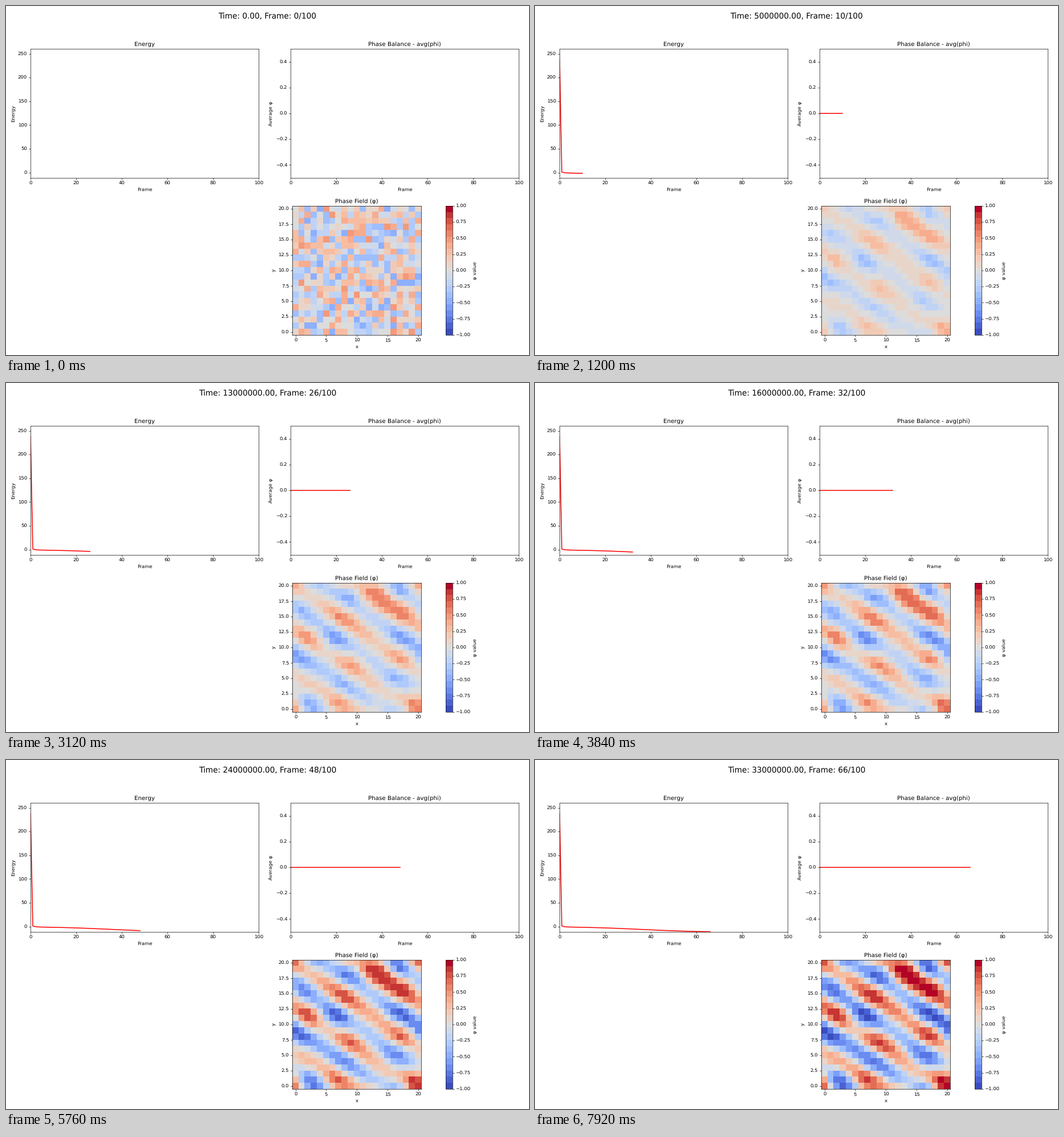
These frames come from a looping animation (917x611 px, 8 s). A matplotlib script:

```python
import numpy as np
import matplotlib.pyplot as plt
from matplotlib.animation import FuncAnimation

W, H, DPI = 917, 611, 61.125
STEPS, TICK, HOLD = 200, 40, 3      # each step of the run stays for three ticks
LAST = 66
N = 21                              # cells per side, periodic
SPOT = 2.0                          # radius of a peak or pit in cells

# Cells where the stripes are deepest
PEAKS = [(8, 15), (18, 16), (2, 11), (9, 7), (17, 8), (7, 1), (20, 1), (14, 19)]
PITS = [(8, 4), (16, 5), (2, 1), (9, 18), (17, 20), (6, 11), (17, 11), (0, 8),
        (1, 16)]

plt.rcParams.update({"font.family": "DejaVu Sans", "text.hinting": "none"})


def stripes(x, y):
    """Diagonal wave, two periods across and three up."""
    return 0.55 * np.cos(2 * np.pi * (2 * x + 3 * y - 17.3) / N)


def kernel(ax, ay, bx, by):
    """Gaussian of the wrapped distance between two sets of points."""
    dx = (ax[:, None] - bx + N / 2) % N - N / 2
    dy = (ay[:, None] - by + N / 2) % N - N / 2
    return np.exp(-(dx**2 + dy**2) / (2 * SPOT**2))


def settled_field():
    """Stripes bent so that they pass through every peak and pit."""
    px, py = np.array(PEAKS + PITS, float).T
    goal = np.repeat([0.88, -0.82], [len(PEAKS), len(PITS)])
    weights = np.linalg.solve(kernel(px, py, px, py), goal - stripes(px, py))
    gy, gx = (g.ravel().astype(float) for g in np.mgrid[:N, :N])
    field = stripes(gx, gy) + kernel(gx, gy, px, py) @ weights
    return np.clip(field, -0.93, 0.93).reshape(N, N)


def blur(a):
    for axis in (0, 1):
        a = (np.roll(a, 1, axis) + a + np.roll(a, -1, axis)) / 3
    return a


def logistic(n, middle, width):
    return 1 / (1 + np.exp(-(n - middle) / width))


drive = np.arctanh(settled_field())
noise = np.random.default_rng(7).uniform(-0.48, 0.48, (N, N))
noise -= noise.mean()
residue = blur(blur(noise))


def phi(n):
    if n == 0:
        return noise
    growth = 1.25 * logistic(n, 41, 20)
    return np.tanh(growth * drive) + 0.6 * np.exp(-n / 4) * residue


steps = np.arange(LAST + 1)
energy = 2 * np.exp(1 - steps) - 12.3 * logistic(steps, 36, 14)
energy[0] = 238

fig = plt.figure(figsize=((W + 0.001) / DPI, (H + 0.001) / DPI), dpi=DPI,
                 facecolor="white")


def panel(left, top, right, bottom):
    return fig.add_axes([left / W, 1 - bottom / H,
                         (right - left) / W, (bottom - top) / H])


def label(ax, title, xlabel, ylabel):
    ax.set_title(title)
    ax.set_xlabel(xlabel)
    ax.set_ylabel(ylabel)


def history(left, right, title, ylabel, ylim, yticks):
    ax = panel(left, 75, right, 301)
    label(ax, title, "Frame", ylabel)
    ax.set_xlim(0, 100)
    ax.set_yticks(yticks)
    ax.set_ylim(ylim)
    return ax.plot([], [], color="red", linewidth=1.8)[0]


energy_line = history(43, 443.2, "Energy", "Energy",
                      (-11.4, 260.5), range(0, 251, 50))
balance_line = history(499.2, 899.4, "Phase Balance - avg(phi)", "Average φ",
                       (-0.5, 0.5), np.linspace(-0.4, 0.4, 5))

field_ax = panel(502.3, 349.9, 728.2, 575.9)
image = field_ax.imshow(noise, origin="lower", aspect="auto",
                        cmap=plt.get_cmap("coolwarm", 21), vmin=-1, vmax=1,
                        interpolation="nearest")
label(field_ax, "Phase Field (φ)", "x", "y")
field_ax.set_xticks(range(0, 21, 5))
field_ax.set_yticks(np.arange(0, 20.1, 2.5))

fig.colorbar(image, cax=panel(771.2, 349.9, 782.5, 575.9),
             ticks=np.linspace(-1, 1, 9), label="φ value")

heading = fig.suptitle("", fontsize=16)


def draw(tick):
    n = min(tick // HOLD, LAST)
    heading.set_text(f"Time: {n * 500000:.2f}, Frame: {n}/100")
    energy_line.set_data(steps[:n + 1], energy[:n + 1])
    balance_line.set_data(steps[:n + 1], np.zeros(n + 1))
    image.set_data(phi(n))
    return heading, energy_line, balance_line, image


anim = FuncAnimation(fig, draw, frames=STEPS, interval=TICK, repeat=True,
                     repeat_delay=0, init_func=lambda: draw(0))
plt.show()
```
